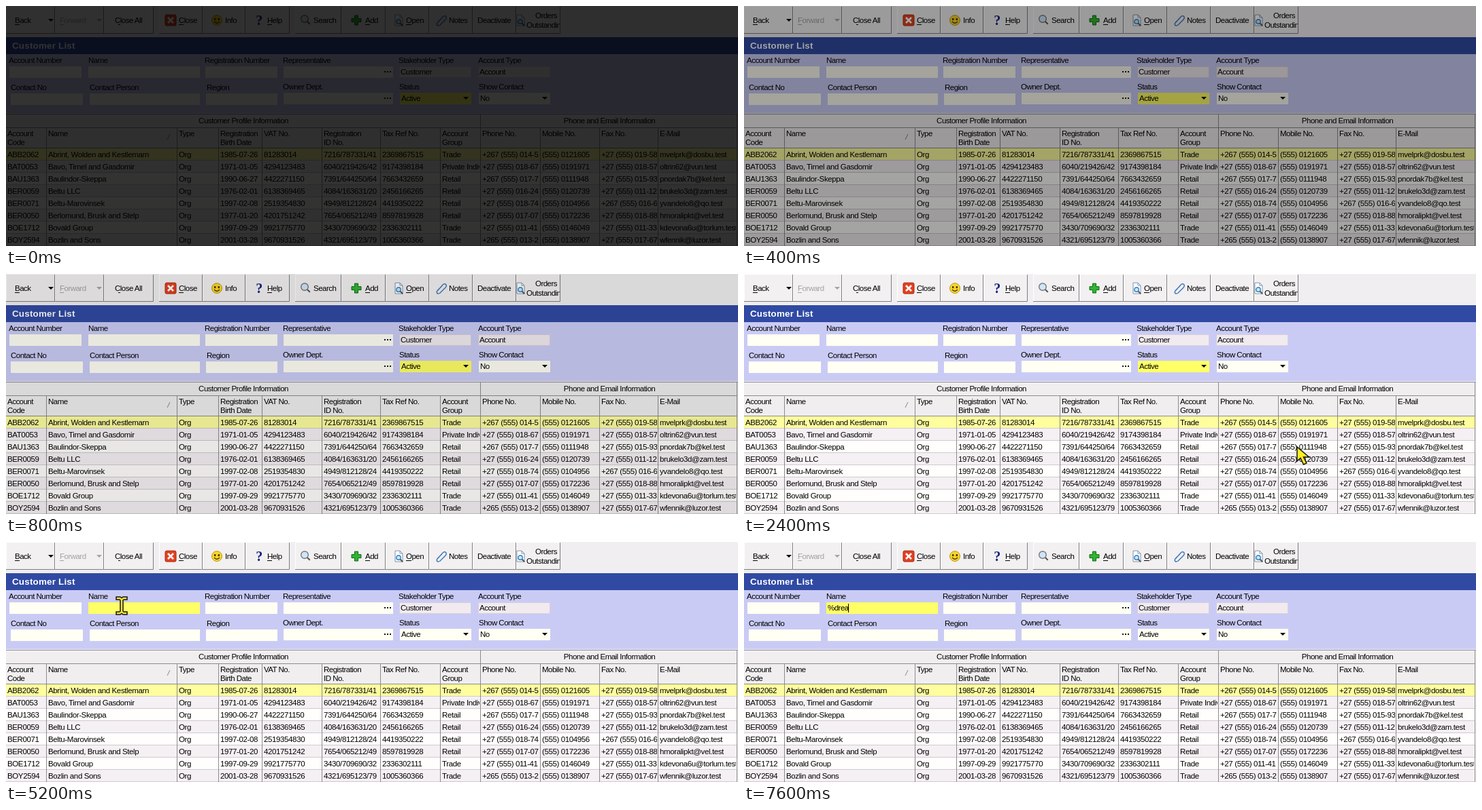
An HTML page that plays this animation: 1076x354 px, repeating every 8000 ms.

```html
<!DOCTYPE html>
<html lang="en">
<head>
<meta charset="utf-8">
<title>Customer List</title>
<style>
  html, body { margin: 0; width: 100%; height: 100%; overflow: hidden; background: #f0eef0; }
  svg { display: block; }
  text { font: 11.5px "Liberation Sans", Arial, sans-serif; letter-spacing: -.52px; fill: #000; white-space: pre; }
  .cell { letter-spacing: -.38px; }
  .title { font-size: 13.4px; font-weight: bold; letter-spacing: .2px; fill: #fff; }
  .off { fill: #a3a3a3; }
  .help { font: bold 20px "Liberation Serif", serif; fill: #14207c; }
</style>
</head>
<body>
<svg id="stage" width="1076" height="354" viewBox="0 0 1076 354"></svg>
<script>
const LOOP = 8000, STEP = 200;
const YELLOW = '#ffff66', CREAM = '#fffff4', GREY = '#f1ebf0';

const rect = (x, y, w, h, fill, extra = '') =>
  `<rect x="${x}" y="${y}" width="${w}" height="${h}" fill="${fill}" ${extra}/>`;
const text = (x, y, s, cls = '', extra = '') =>
  `<text x="${x}" y="${y}" class="${cls}" ${extra}>${s}</text>`;
const path = (d, fill, extra = '') => `<path d="${d}" fill="${fill}" ${extra}/>`;
const line = (d, color, w = 1, extra = '') =>
  path(d, 'none', `stroke="${color}" stroke-width="${w}" ${extra}`);
const group = (x, y, body, extra = '') => `<g transform="translate(${x} ${y})" ${extra}>${body}</g>`;
const clip = (x, y, w, h, body) =>
  `<svg x="${x}" y="${y}" width="${w}" height="${h}" overflow="hidden">${body}</svg>`;
const arrow = (x, y, color = '#000') => path(`M${x - 4} ${y - 2}h8l-4 4z`, color);

// Toolbar
const lens = (x, y, r, color) =>
  line(`M${x + r * .7} ${y + r * .7}l4 4`, '#555', 2) +
  `<circle cx="${x}" cy="${y}" r="${r}" fill="#cfe6f8" stroke="${color}" stroke-width="1.4"/>`;
const sheet = path('M-5-8h7l4 4v12h-11z', '#fff', 'stroke="#8091a5"') +
  line('M2-8v4h4', '#8091a5') + lens(0, 2, 3.2, '#2d83c4');

const icons = {
  close: rect(-8, -8, 16, 16, '#e2401f', 'rx="2" stroke="#a92a12"') +
    line('M-4-4l8 8M4-4l-8 8', '#fff', 2.6),
  info: '<circle r="7.5" fill="#f8d52c" stroke="#c29a12"/>' +
    path('M-4-3h2.4v3h-2.4zM1.6-3h2.4v3h-2.4z', '#4a3a06') + line('M-4 2q4 4.500 8 0', '#4a3a06', 1.3),
  help: text(0, 7, '?', 'help', 'text-anchor="middle"'),
  search: lens(-1, -2, 5.3, '#777'),
  add: path('M-2.500-7h5v4.500h4.500v5h-4.500v4.500h-5v-4.500h-4.500v-5h4.500z', '#2fb52f', 'stroke="#12691a"'),
  open: sheet,
  notes: line('M-6 4l8-9q3-3 5 0q1 2-1 4l-8 8q-3 2-4.500 0q-1-2 1-4l6-6', '#3f78b8', 1.5)
};

// left, right, label, label x, underline width, icon, icon x
const buttons = [
  [0, 72, 'Back', 13, 7], [72, 144, 'Forward', 79, 6], [144, 217, 'Close All', 160, 0],
  [225, 289, 'Close', 254, 7, 'close', 242], [289, 352, 'Info', 322, 0, 'info', 310],
  [352, 417, 'Help', 384, 7, 'help', 372], [425, 493, 'Search', 452, 0, 'search', 440],
  [493, 558, 'Add', 528, 7, 'add', 515], [558, 622, 'Open', 588, 8, 'open', 577],
  [622, 686, 'Notes', 651, 0, 'notes', 640], [686, 750, 'Deactivate', 693, 0],
  [750, 815, '', 0, 0, 'open', 756]
];

function button([l, r, label, x, under, icon, ix]) {
  const cls = label === 'Forward' ? 'off' : '', ink = cls ? '#a3a3a3' : '#000';
  return rect(l, 0, r - l, 41, '#f2f0f1') +
    line(`M${l + .5} 40V.5H${r - 1}`, '#fff') +
    line(`M${r - .5} 1V40.500H${l}`, '#7d7d80') +
    text(x, 25, label, cls) +
    (under ? line(`M${x} 27.500h${under}`, ink) : '') +
    (icon ? group(ix, 21, icons[icon]) : '');
}

const toolbar = rect(0, 0, 1076, 46, '#f0eef0') + buttons.map(button).join('') +
  line('M165 27.500h3', '#000') +
  arrow(66, 21) + arrow(137, 21, '#a3a3a3') +
  clip(750, 0, 64, 40, text(28, 18, 'Orders') + text(15, 32, 'Outstanding'));

// Search form: label, label x, left, right, row, fill, value, id
const fields = [
  ['Account Number', 4, 5, 111, 0, CREAM], ['Name', 121, 121, 285, 0, CREAM, '', 'name'],
  ['Registration Number', 292, 293, 399, 0, CREAM], ['Representative', 407, 408, 569, 0, CREAM, '...'],
  ['Stakeholder Type', 577, 578, 684, 0, GREY, 'Customer'],
  ['Account Type', 694, 694, 800, 0, GREY, 'Account'],
  ['Contact No', 7, 7, 113, 1, CREAM], ['Contact Person', 123, 123, 285, 1, CREAM],
  ['Region', 295, 294, 399, 1, CREAM], ['Owner Dept.', 407, 408, 569, 1, CREAM, '...'],
  ['Status', 578, 579, 684, 1, YELLOW, 'Active', 'status'],
  ['Show Contact', 695, 695, 800, 1, CREAM, 'No']
];

function field([label, lx, l, r, row, fill, value = '', id = '']) {
  const drop = row * 40 - (row && lx > 400 ? 1 : 0), y = 89 + drop;
  let body = text(lx, 84 + drop, label) +
    rect(l, y, r - l, 17, fill, id && `id="${id}"`);
  if (fill === GREY) body += rect(l + .5, y + .5, r - l - 1, 16, 'none', 'stroke="#d6d0da"');
  if (value === '...')
    for (let i = 0; i < 3; i++) body += rect(r - 13 + i * 4, y + 7, 2, 2, '#111');
  else body += text(l + 2, y + 12, value);
  if (row && l > 570) body += arrow(r - 8, y + 8);
  return body;
}

const form = rect(0, 46, 1076, 25, '#304aa3') + text(9, 63, 'Customer List', 'title') +
  rect(0, 71, 1076, 88, '#cacbf5') + fields.map(field).join('');

// Grid
const edges = [0, 59, 251, 312, 376, 464, 550, 638, 697, 785, 872, 958, 1074];
const heads = ['Account|Code', 'Name', 'Type', 'Registration|Birth Date', 'VAT No.', 'Registration|ID No.',
  'Tax Ref No.', 'Account|Group', 'Phone No.', 'Mobile No.', 'Fax No.', 'E-Mail'];
const rows = `
ABB2062|Abrint, Wolden and Kestlemarn|1985-07-26|81283014|7216/787331/41|2369867515|Trade|+267 (555) 014-5|(555) 0121605|+27 (555) 019-58|mvelprk@dosbu.test
BAT0053|Bavo, Tirnel and Gasdomir|1971-01-05|4294123483|6040/219426/42|9174398184|Private Indiv|+27 (555) 018-67|(555) 0191971|+27 (555) 018-57|oltrin62@vun.test
BAU1363|Baulindor-Skeppa|1990-06-27|4422271150|7391/644250/64|7663432659|Retail|+267 (555) 017-7|(555) 0111948|+27 (555) 015-93|pnordak7b@kel.test
BER0059|Beltu LLC|1976-02-01|6138369465|4084/163631/20|2456166265|Retail|+27 (555) 016-24|(555) 0120739|+27 (555) 011-12|brukelo3d@zam.test
BER0071|Beltu-Marovinsek|1997-02-08|2519354830|4949/812128/24|4419350222|Retail|+27 (555) 018-74|(555) 0104956|+267 (555) 016-6|yvandelo8@qo.test
BER0050|Berlomund, Brusk and Stelp|1977-01-20|4201751242|7654/065212/49|8597819928|Retail|+27 (555) 017-07|(555) 0172236|+27 (555) 018-88|hmoralipkt@vel.test
BOE1712|Bovald Group|1997-09-29|9921775770|3430/709690/32|2336302111|Trade|+27 (555) 011-41|(555) 0146049|+27 (555) 011-33|kdevona6u@torlum.test
BOY2594|Bozlin and Sons|2001-03-28|9670931526|4321/695123/79|1005360366|Trade|+265 (555) 013-2|(555) 0138907|+27 (555) 017-67|wfennik@luzor.test
`.trim().split('\n').map(r => r.split('|'));

const pad = i => i === 0 ? 2 : 3;
const cells = rows.map((r, n) => {
  const y = 210 + n * 18, values = [...r.slice(0, 2), 'Org', ...r.slice(2)];
  return rect(0, y, 1076, 18, n === 0 ? '#fefe9f' : n % 2 ? '#f5f0f3' : '#fffefc') +
    line(`M0 ${y + 17.5}H1074`, '#cfcbcf') +
    values.map((v, i) => clip(edges[i], y, edges[i + 1] - edges[i] - 1, 18, text(pad(i), 13, v, 'cell'))).join('');
}).join('');

const grid = rect(0, 159, 1076, 51, '#f0eeef') + cells +
  line('M0 159.500H1076M0 179.500H1074M0 209.500H1074', '#8d8b8d') +
  line('M0 158.500H1076', '#f4f3fb') +
  edges.slice(1).map(x => line(`M${x + .5} ${x === 697 || x === 1074 ? 160 : 180}V354`, '#8d8b8d')).join('') +
  text(349, 173, 'Customer Profile Information', '', 'text-anchor="middle"') +
  text(887, 173, 'Phone and Email Information', '', 'text-anchor="middle"') +
  heads.map((h, i) => h.split('|').map((s, k) => text(edges[i] + pad(i), 192 + k * 13, s)).join('')).join('') +
  line('M237 197l4-8', '#858585');

const pointer = path('M0 0V21l5-4.500l4.500 9.500l4.500-2l-4.500-9h8z', '#ffee22', 'stroke="#151515" stroke-width="1.5"');
const beam = path('M-8-13h6l2 1.500l2-1.500h6v4h-5l-1 1v16l1 1h5v4h-6l-2-1.500l-2 1.500h-6v-4h5l1-1v-16l-1-1h-5z',
  '#f4e43a', 'stroke="#151515" stroke-width="1.5"');

const $ = id => document.getElementById(id);
const show = (id, on) => $(id).setAttribute('visibility', on ? 'visible' : 'hidden');

$('stage').innerHTML = toolbar + form + grid +
  text(123, 101, '', '', 'id="typed"') + rect(0, 91, 1, 13, '#000', 'id="caret"') +
  group(0, 0, pointer, 'id="pointer"') + group(170, 94, beam, 'id="beam"') +
  rect(0, 0, 1076, 354, '#000', 'id="shade"');

const keys = [[5600, '%'], [6600, 'd'], [7000, 'r'], [7200, 'e'], [7600, 'a']];

function draw(ms) {
  const t = Math.floor(ms / STEP) * STEP;

  const fade = Math.min(t / 1200, 1);
  $('shade').setAttribute('opacity', .8 * (1 - fade) ** 2);

  const p = Math.min(Math.max((t - 2400) / 1000, 0), 1), e = p * p * (3 - 2 * p);
  $('pointer').setAttribute('transform', `translate(${813 - 643 * e} ${255 - 161 * e})`);
  show('pointer', t >= 2400 && t < 3400);
  show('beam', t >= 3400 && t < 5600);

  const active = t >= 3800;
  $('name').setAttribute('fill', active ? YELLOW : CREAM);
  $('status').setAttribute('fill', active ? CREAM : YELLOW);

  const pressed = keys.filter(k => t >= k[0]);
  $('typed').textContent = pressed.map(k => k[1]).join('');
  const last = pressed.length ? pressed[pressed.length - 1][0] : -Infinity;
  show('caret', t - last < 600);
  $('caret').setAttribute('x', 123 + Math.round($('typed').getComputedTextLength() - 1));
}

const start = performance.now();
function tick() {
  draw((performance.now() - start) % LOOP);
  requestAnimationFrame(tick);
}
tick();
</script>
</body>
</html>
```
